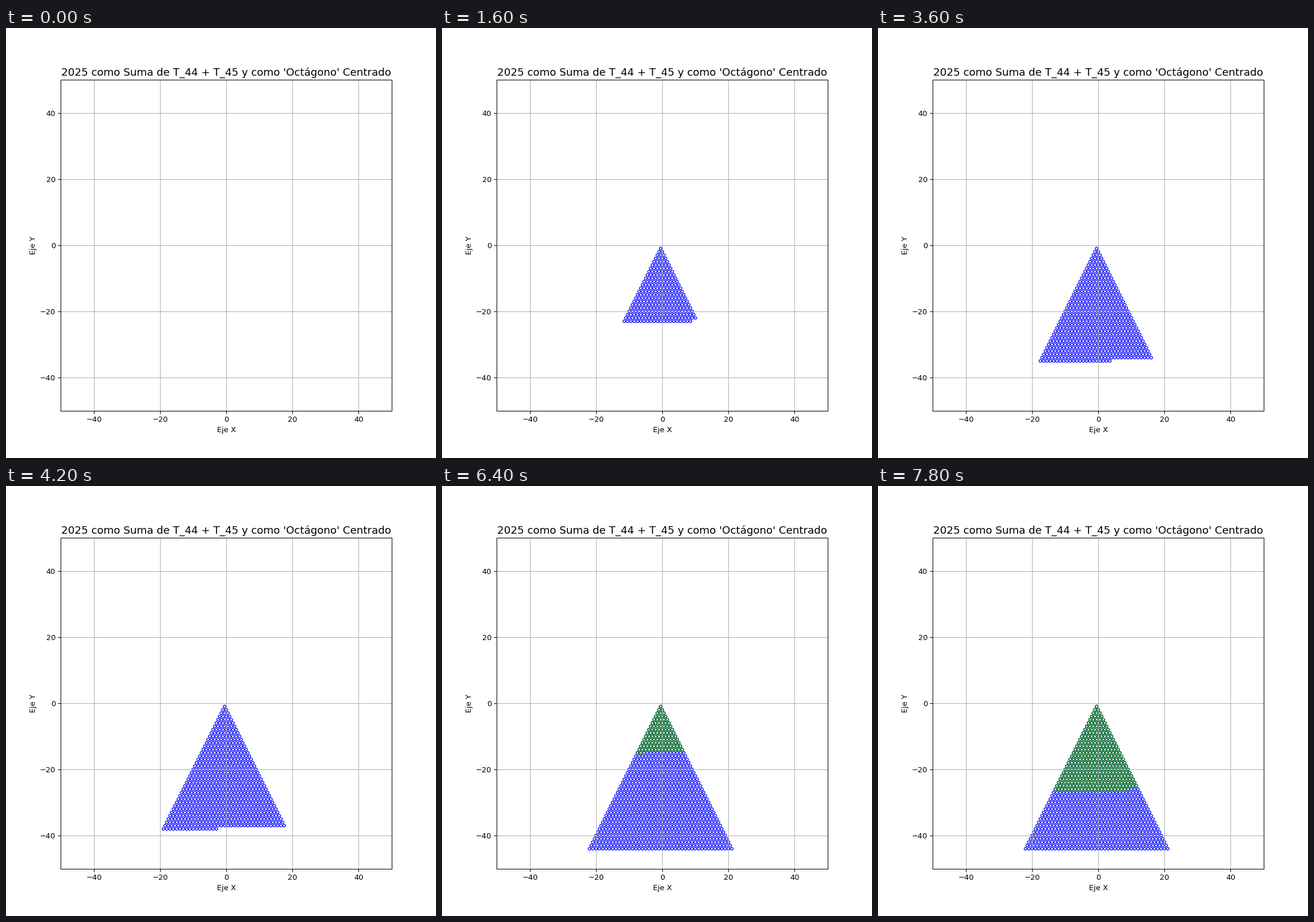
Animation, 748 px wide and 748 px high, one loop 8 s. Source, as a matplotlib script:

```python
import matplotlib.pyplot as plt
from matplotlib.animation import FuncAnimation
from matplotlib.collections import PathCollection
from matplotlib.path import Path

STAGE = 748
FRAMES = 40
INTERVAL = 200
TOTAL = 2025
STEPS = 59  # frame intervals needed to place all the points
RADIUS = 0.4


def triangle(rows):
    """Circles of a triangular number, row by row from the apex down."""
    return [Path.circle((k - r / 2, -r), RADIUS)
            for r in range(1, rows + 1) for k in range(r)]


small, large = triangle(44), triangle(45)

fig = plt.figure(figsize=(8, 8), dpi=STAGE / 8)
left, bottom, side = 95.45, 82.45, 575.5
ax = fig.add_axes([v / STAGE for v in (left, bottom, side, side)])
ax.set_xlim(-50, 50)
ax.set_ylim(-50, 50)
ax.set_xticks(range(-40, 41, 20))
ax.set_yticks(range(-40, 41, 20))
ax.set_title("2025 como Suma de T_44 + T_45 y como 'Octágono' Centrado", fontsize=14.08)
ax.set_xlabel("Eje X")
ax.set_ylabel("Eje Y")
ax.grid(True)


def rings(color):
    group = PathCollection([], facecolors="none", edgecolors=color, linewidths=1)
    return ax.add_collection(group, autolim=False)


blue, green = rings("blue"), rings("green")


def update(i):
    n = i * TOTAL // STEPS
    blue.set_paths(small[:n])
    green.set_paths(large[:max(0, n - len(small))])
    return blue, green


anim = FuncAnimation(fig, update, frames=FRAMES, interval=INTERVAL,
                     init_func=lambda: update(0), repeat=True, repeat_delay=0)
plt.show()
```
